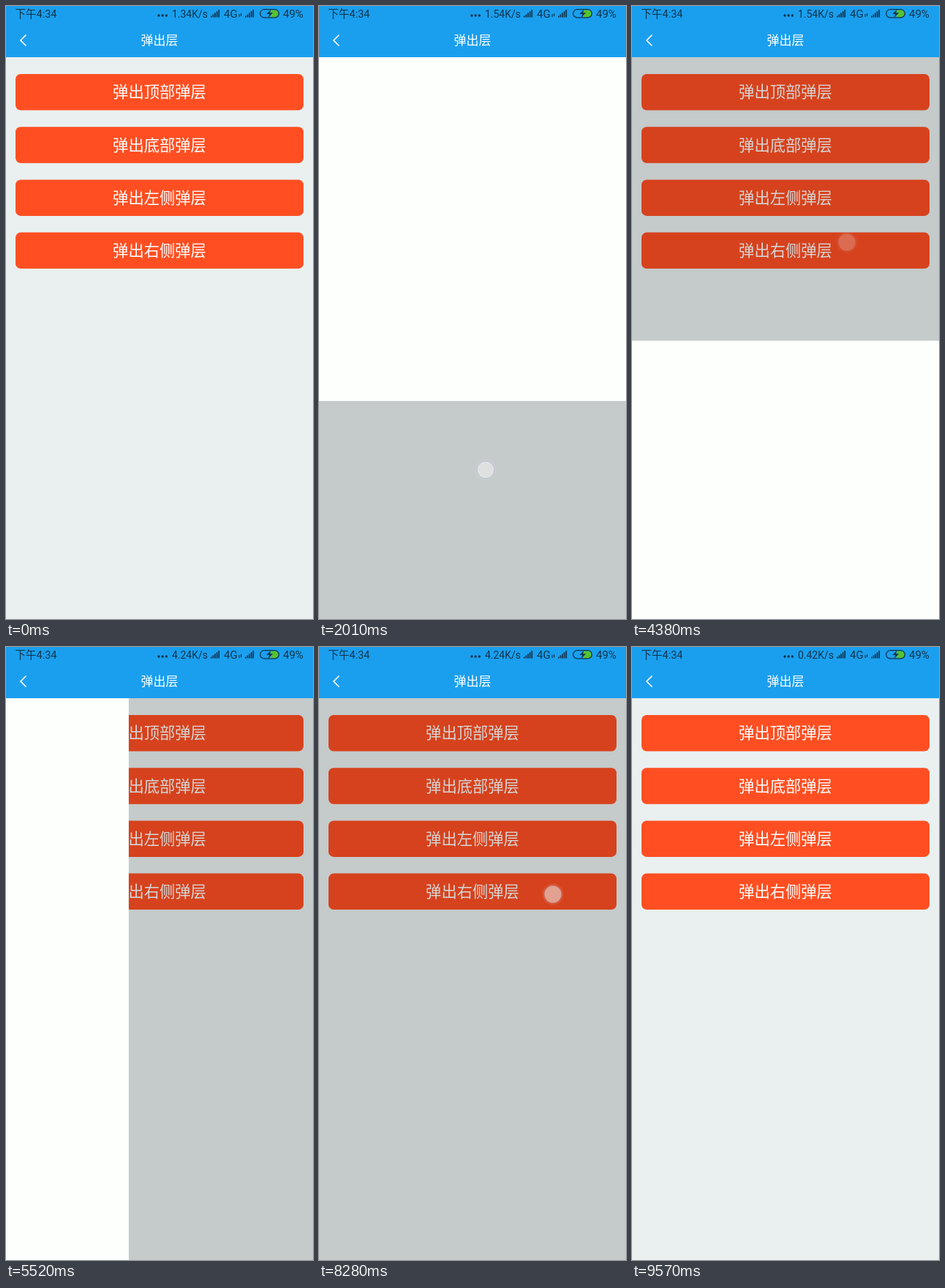
These frames come from a looping animation (420x838 px, 9900 ms). An HTML page:

```html
<!DOCTYPE html>
<html lang="zh-CN">
<head>
<meta charset="utf-8">
<title>弹出层</title>
<style>
  html, body { margin: 0; width: 100%; height: 100%; overflow: hidden; background: #eaf0f0; }
  svg { display: block; width: 100%; height: 100%; }
  text { font-family: "Noto Sans CJK SC", "Noto Sans CJK", sans-serif; }
  .status text { font-family: Roboto, "Noto Sans CJK SC", "Noto Sans CJK", sans-serif; font-size: 14px; fill: #12344c; }
  .status .big { font-size: 15px; }
  .title { font-size: 17px; font-weight: 500; fill: #fff; text-anchor: middle; }
  .label { font-size: 21.3px; fill: #fff; text-anchor: middle; }
  .panel { fill: #fdfffd; }
  .touch, .mask { opacity: 0; }
</style>
</head>
<body>
<svg id="stage" viewBox="0 0 420 838" preserveAspectRatio="none">
  <rect width="420" height="838" fill="#eaf0f0"/>
  <g id="buttons"></g>
  <g id="popups"></g>
  <rect width="420" height="70" fill="#1a9fee"/>
  <path d="M27.5 39.5 20 47l7.5 7.5" fill="none" stroke="#fff" stroke-width="1.7"/>
  <text class="title" x="210" y="53.3">弹出层</text>
  <g class="status">
    <text x="12.5" y="15.7" style="font-size:14.5px">下午4:34</text>
    <g fill="#12344c">
      <circle cx="209" cy="13" r="1.7"/><circle cx="214.2" cy="13" r="1.7"/><circle cx="219.4" cy="13" r="1.7"/>
      <g id="bars"></g>
      <path d="M318.5 11h1.2v4h-1.2zM321 10h1.2v4H321z"/>
    </g>
    <g id="speeds"></g>
    <text class="big" x="298" y="15.7">4G</text>
    <path d="M362 5.5h6a5 5 0 0 1 0 10h-6z" fill="#55c332"/>
    <rect x="347.7" y="4.7" width="25.6" height="11.2" rx="5.6" fill="none" stroke="#12344c" stroke-width="1.3"/>
    <path d="M362.5 4.8 356.3 11h4l-1.7 5 6.6-6.7h-4.2z" fill="#12344c"/>
    <text class="big" x="379" y="15.7">49%</text>
  </g>
  <g id="touches"></g>
</svg>
<script>
const LOOP = 9900, OPEN = 270, CLOSE = 282, FADE = 150;
const $ = id => document.getElementById(id);

function add(parent, tag, attrs, text) {
  const el = document.createElementNS('http://www.w3.org/2000/svg', tag);
  for (const k in attrs) el.setAttribute(k, attrs[k]);
  if (text) el.textContent = text;
  return parent.appendChild(el);
}

// steps: [time, value, easing towards the next step]
function play(el, prop, steps) {
  const frames = steps.map(([t, v, easing = 'step-end']) =>
    ({ offset: t / LOOP, [prop]: v, easing }));
  frames.unshift({ ...frames[0], offset: 0, easing: 'step-end' });
  frames.push({ ...frames[frames.length - 1], offset: 1 });
  el.animate(frames, { duration: LOOP, iterations: Infinity }).startTime = 0 + start;
}
const start = document.timeline.currentTime || 0;

['顶部', '底部', '左侧', '右侧'].forEach((side, i) => {
  const y = 93 + i * 72.2;
  add($('buttons'), 'rect', { x: 13, y, width: 394, height: 49.5, rx: 7, fill: '#ff4f22' });
  add($('buttons'), 'text', { class: 'label', x: 210, y: y + 32.4 }, `弹出${side}弹层`);
});

// One popup per side: resting box, hidden shift, opening start, closing end
const popups = [
  { box: [0, 70, 420, 470], shift: [0, -470], open: 1110, end: 2340 },
  { box: [0, 368, 420, 470], shift: [0, 470], open: 3300, end: 4620 },
  { box: [0, 70, 252, 768], shift: [-252, 0], open: 5416, end: 7800 },
  { box: [168, 70, 252, 768], shift: [252, 0], open: 8370, end: 9570 }
];
const mask = add($('popups'), 'rect', { class: 'mask', y: 70, width: 420, height: 768, fill: 'rgba(0,0,0,.16)' });
play(mask, 'opacity', popups.flatMap(p => [[p.open - 110, 1], [p.end, 0]]).reduce((a, s) => [...a, s], [[0, 0]]));

for (const { box: [x, y, width, height], shift: [dx, dy], open, end } of popups) {
  const panel = add($('popups'), 'rect', { class: 'panel', x, y, width, height });
  const away = `translate(${dx}px, ${dy}px)`, home = 'translate(0px, 0px)';
  play(panel, 'transform', [
    [open, away, 'ease'], [open + OPEN, home],
    [end - CLOSE, home, 'ease'], [end, away]
  ]);
}

// Finger marks: x, y, press, release, optional drag [x, y, from, to]
const touches = [
  [300, 120, 780, 990],
  [228, 634, 1710, 2010],
  [302, 198, 3060, 3180],
  [294, 323, 4110, 4284],
  [335, 262, 5130, 5296],
  [202, 526, 6270, 6770, [180, 342, 6470, 6760]],
  [351, 513, 7290, 7470],
  [320, 338, 8100, 8250],
  [72, 503, 8940, 9230]
];
for (const [x, y, down, up, drag] of touches) {
  const g = add($('touches'), 'g', { class: 'touch' });
  add(g, 'circle', { cx: x, cy: y, r: 14.5, fill: 'rgba(235,235,235,.13)' });
  add(g, 'circle', { cx: x, cy: y, r: 11.5, fill: 'rgba(235,235,235,.68)' });
  add(g, 'circle', { cx: x, cy: y, r: 12, fill: 'none', stroke: 'rgba(165,170,215,.5)' });
  play(g, 'opacity', [[0, 0], [down, 1], [up, 1, 'linear'], [up + FADE, 0]]);
  if (drag) {
    const [tx, ty, from, to] = drag;
    play(g, 'transform', [
      [from, 'translate(0px, 0px)', 'ease-in-out'],
      [to, `translate(${tx - x}px, ${ty - y}px)`]
    ]);
  }
}

for (const x of [280, 327])
  for (let i = 0; i < 5; i++) {
    const h = 2 + i * 2.1;
    add($('bars'), 'rect', { x: x + i * 2.6, y: 15.5 - h, width: 1.7, height: h });
  }

const speeds = [['1.34', 0], ['1.54', 1740], ['4.24', 5340], ['0.42', 8940]];
speeds.forEach(([value, from], i) => {
  const label = add($('speeds'), 'text', { x: 276, y: 15.7, 'text-anchor': 'end' }, value + 'K/s');
  const next = speeds[i + 1];
  const steps = from ? [[0, 0], [from, 1]] : [[0, 1]];
  if (next) steps.push([next[1], 0]);
  play(label, 'opacity', steps);
});
</script>
</body>
</html>
```
